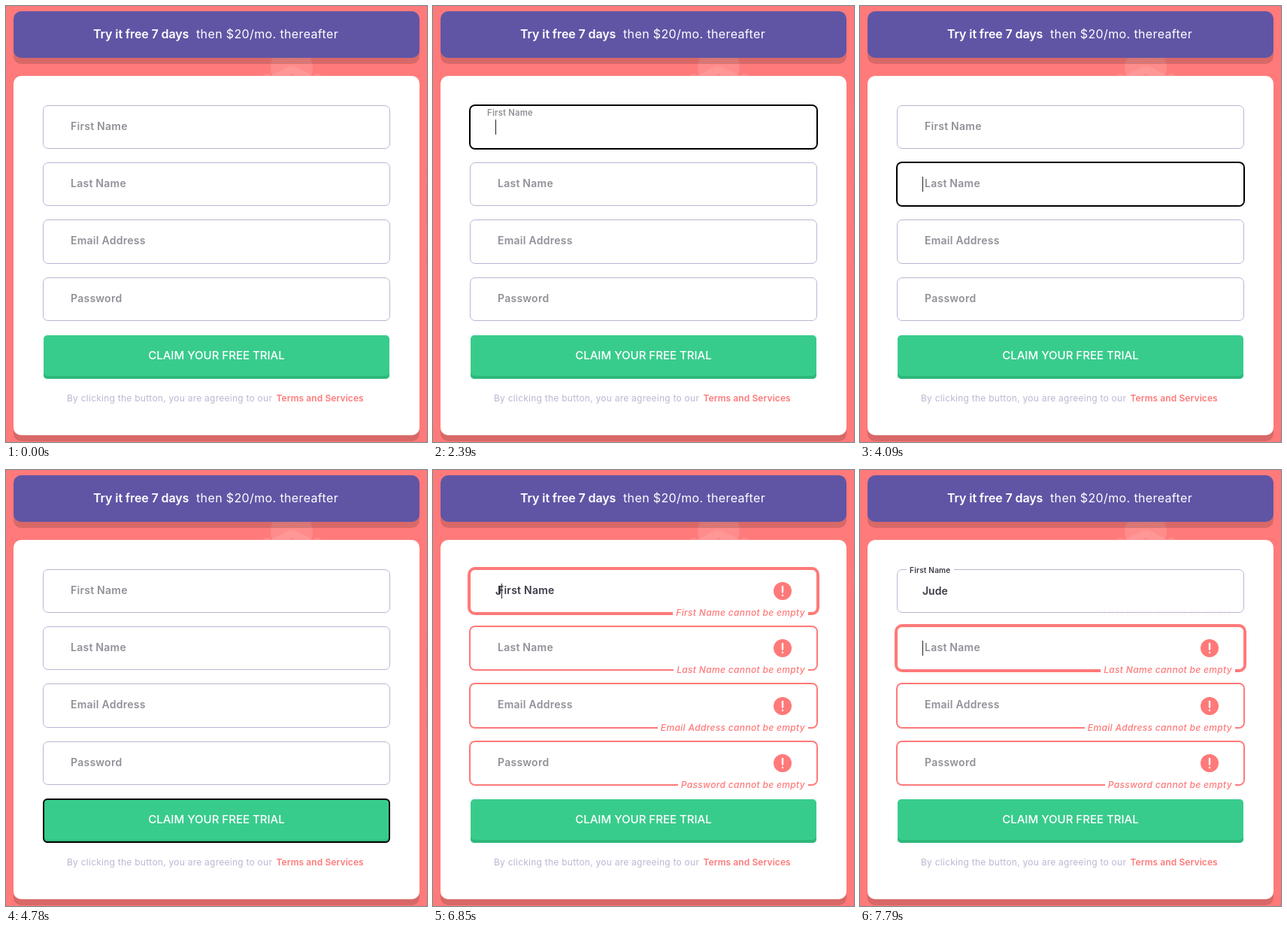
Recreate the animation shown at these times as an HTML page. Size 560 by 580 pixels, loop 8000 ms.

```html
<!DOCTYPE html>
<html lang="en">
<head>
<meta charset="utf-8">
<title>Sign-up form</title>
<style>
html, body { margin: 0; width: 100%; height: 100%; overflow: hidden; }
body { position: relative; background: #ff7a7a; font-family: Inter, "Open Sans", sans-serif; }
body *, #stage { position: absolute; white-space: pre; }
#stage { inset: 0; }
.panel { left: 10px; width: 540px; border-radius: 10px; box-shadow: 0 8px rgba(0, 0, 0, .15); }
.text { line-height: 20px; }
.field { left: 49px; width: 460px; border: 1px solid #b9b6d3; border-radius: 7px; background: #fff; }
.label { left: 30px; top: 17px; padding: 0 6px; background: #fff; color: #938f98;
  font: 600 14px/20px Inter, "Open Sans", sans-serif; letter-spacing: .25px; transform-origin: 0 50%; }
.value { left: 33px; top: 18px; height: 20px; border-right: 1px solid transparent; color: #3d3b48;
  font: 600 14px/20px Inter, "Open Sans", sans-serif; }
.icon { left: 403px; width: 24px; height: 24px; }
.error { right: 11px; bottom: -9px; padding: 0 4px; background: #fff; color: #ff7979;
  font: italic 500 12px/16px Inter, "Open Sans", sans-serif; letter-spacing: .33px; }
.button { left: 50px; top: 438px; width: 460px; height: 58px; border-radius: 5px;
  background: #38cc8c; box-shadow: inset 0 -4px #2fb87c; }
.ring { left: 49px; top: 437px; width: 458px; height: 55px; border: 2px solid #000; border-radius: 6px; }
</style>
</head>
<body>
<div id="stage">
  <svg width="560" height="580" fill="#fff" fill-opacity=".13">
    <circle cx="371" cy="62" r="28"/>
    <path d="M371 62L340 78M371 62L402 78M371 62L354 90M371 62L388 90" stroke="#fff" stroke-opacity=".1" stroke-width="7"/>
    <ellipse cx="338" cy="76" rx="7" ry="6"/><ellipse cx="405" cy="76" rx="7" ry="6"/>
    <circle cx="353" cy="90" r="6"/><circle cx="390" cy="90" r="6"/>
    <circle cx="58" cy="92" r="7"/><circle cx="89" cy="91" r="7"/>
    <rect x="550" y="115" width="10" height="22" fill-opacity=".06"/>
    <g fill="#a04a4a">
      <rect x="550" y="199" width="10" height="10"/><rect x="550" y="219" width="10" height="49"/>
      <rect x="550" y="306" width="10" height="20"/><rect x="550" y="545" width="10" height="26" fill-opacity=".06"/>
    </g>
  </svg>
  <div class="panel" style="top:7px;height:62px;background:#6055a5"></div>
  <div class="text" style="left:116px;top:27px;color:#fff;font-size:16px;font-weight:600;letter-spacing:-.1px">Try it free 7 days</div>
  <div class="text" style="left:253px;top:27px;color:#fff;font-size:16px;letter-spacing:.37px">then $20/mo. thereafter</div>
  <div class="panel" style="top:93px;height:478px;background:#fff"></div>
  <div class="button"></div>
  <div class="ring" id="ring"></div>
  <div class="text" style="left:50px;width:460px;top:455px;text-align:center;color:#fff;font-size:15px;font-weight:500">CLAIM YOUR FREE TRIAL</div>
  <div class="text" style="left:81px;top:512px;color:#bab7d4;font-size:12px;letter-spacing:.25px">By clicking the button, you are agreeing to our</div>
  <div class="text" style="left:359.5px;top:512px;color:#ff7979;font-size:12px;font-weight:600;letter-spacing:.08px">Terms and Services</div>
</div>
<script>
const LOOP = 8000, SUBMIT = 5340, NEXT = 7570, RED = '#ff7979';
const stage = document.getElementById('stage'), ring = document.getElementById('ring');

// name, top, height, icon top
const fields = [
  ['First Name', 132, 58, 16], ['Last Name', 208, 58, 16],
  ['Email Address', 284, 59, 17], ['Password', 361, 58, 16]
].map(([name, top, height, iconTop]) => {
  const box = document.createElement('div');
  box.className = 'field';
  box.style.top = top + 'px';
  box.style.height = height - 2 + 'px';
  box.innerHTML = `<div class="label">${name}</div><div class="value"></div>
    <svg class="icon" style="top:${iconTop}px" viewBox="-12 -12 24 24"><circle r="12" fill="${RED}"/>
    <path d="M0-6V1.5M0 5.7V5.8" stroke="#fff" stroke-width="2.4" stroke-linecap="round"/></svg>
    <div class="error">${name} cannot be empty</div>`;
  stage.append(box);
  const part = c => box.querySelector('.' + c);
  return { box, label: part('label'), value: part('value'), icon: part('icon'), error: part('error') };
});

// each entry takes effect from its time on
const focusSteps = [[0, -1], [1020, 0], [4090, 1], [4350, 2], [4550, 3], [4780, 4], [SUBMIT, 0], [NEXT, 1]];
const typing = [[0, ''], [1820, 'J'], [2330, ''], [2600, 'J'], [3450, ''],
  [6850, 'J'], [6930, 'Ju'], [7010, 'Jud'], [7100, 'Jude']];
const labelMoves = [[-LOOP, 0], [1820, 1], [2330, 0], [2600, 1], [3450, 0], [6850, 1]];
const caretOff = [[1560, 1820], [3100, 3450], [5850, 6390]];

const current = (steps, t) => steps.filter(s => s[0] <= t).pop();

// the standard CSS "ease" curve
function ease(x) {
  if (x <= 0) return 0;
  if (x >= 1) return 1;
  let lo = 0, hi = 1, s;
  for (let i = 0; i < 20; i++) {
    s = (lo + hi) / 2;
    if (.75 * s * (1 - s) + s ** 3 < x) lo = s; else hi = s;
  }
  return .3 * s * (1 - s) ** 2 + 3 * s * s * (1 - s) + s ** 3;
}

function draw(t) {
  const focus = current(focusSteps, t)[1];
  const typed = current(typing, t)[1];
  const [moveStart, up] = current(labelMoves, t);
  const k = ease((t - moveStart) / 300), lift = up ? k : 1 - k;
  const caret = !caretOff.some(([a, b]) => t >= a && t < b);
  const shown = t < SUBMIT ? 0 : ease((t - SUBMIT + 50) / 300);

  fields.forEach(({ box, label, value, icon, error }, i) => {
    const first = i === 0, focused = i === focus;
    const bad = t >= SUBMIT && !(first && t >= NEXT);
    const color = bad ? RED : focused ? '#000' : '#b9b6d3';
    const spread = bad ? (focused ? 3 : 1) : focused ? 1 : 0;
    box.style.borderColor = color;
    box.style.boxShadow = `0 0 0 ${spread}px ${color}`;
    icon.style.visibility = bad ? 'visible' : 'hidden';
    error.style.opacity = first && t >= NEXT ? 1 - ease((Math.min(t, 7790) - NEXT) / 300) : shown;
    value.style.borderRightColor = focused && caret ? '#222' : 'transparent';
    if (first) {
      value.textContent = typed;
      label.style.color = typed ? '#3d3b48' : '';
      label.style.transform = `translate(${-18.3 * lift}px, ${-26.5 * lift}px) scale(${1 - .28 * lift})`;
    }
  });
  ring.style.visibility = focus === 4 ? 'visible' : 'hidden';
}

const begin = performance.now();
function tick() {
  draw((performance.now() - begin) % LOOP);
  requestAnimationFrame(tick);
}
tick();
</script>
</body>
</html>
```
